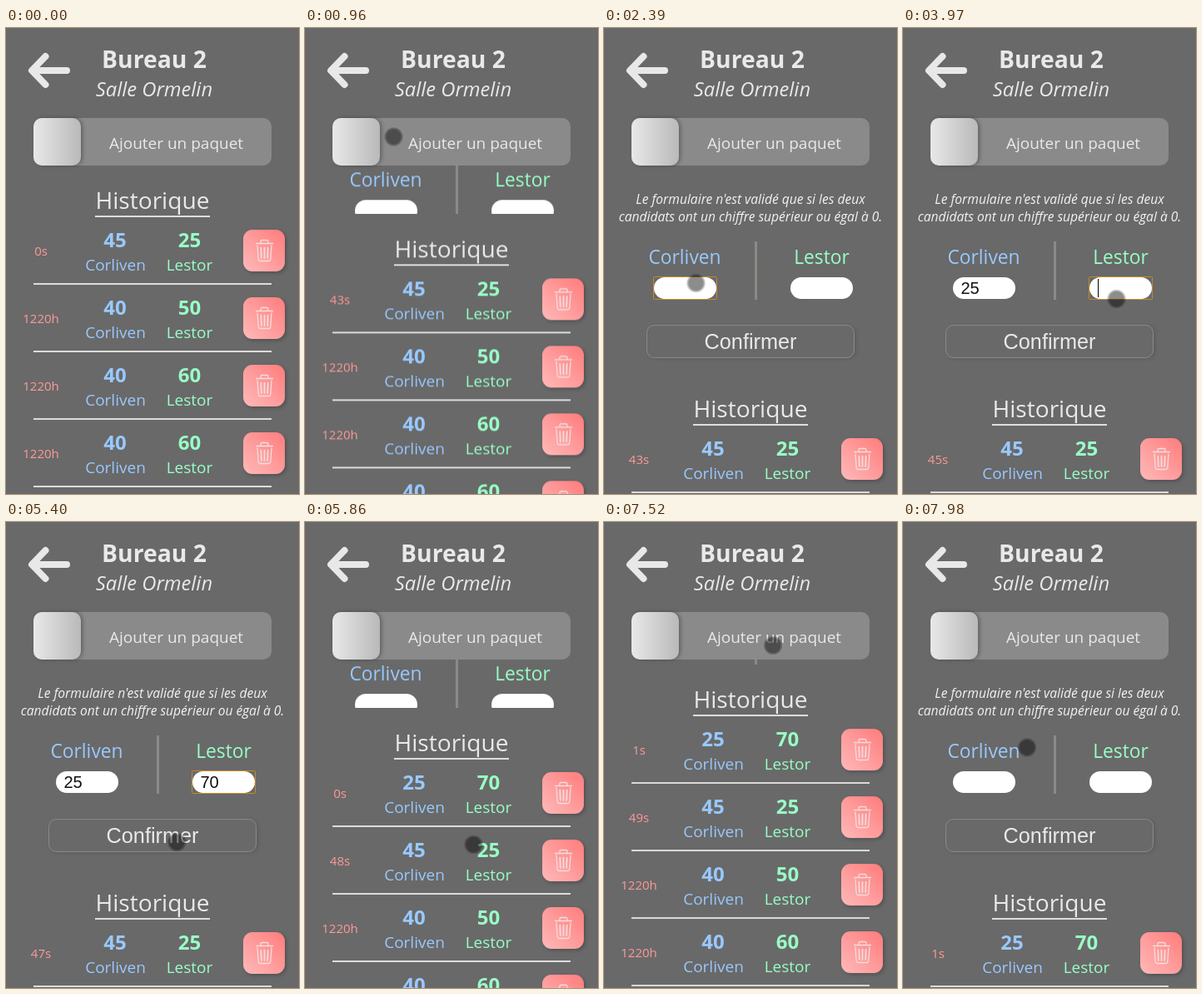
These frames come from a looping animation (352 px wide and 559 px high, 8000 ms). An HTML page:

```html
<!DOCTYPE html>
<html lang="fr">
<head>
<meta charset="utf-8">
<title>Bureau 2</title>
<style>
html, body { margin: 0; height: 100%; overflow: hidden; background: #696969; }
svg { display: block; width: 100vw; height: 100vh; }
text { font-family: "Open Sans", "Noto Sans", sans-serif; fill: #e9e9e9; text-anchor: middle; }
.bold { font-weight: 700; }
.it { font-style: italic; }
.a { fill: #99c9ff; }
.b { fill: #99ffc6; }
.time { fill: #ff9999; font-size: 15px; }
.num { font-size: 24px; font-weight: 700; }
.name { font-size: 19px; }
.label { font-size: 22.8px; }
.hint { font-size: 15.6px; font-style: italic; fill: #f2f2f2; }
.arial { font-family: "Liberation Sans", Arial, sans-serif; }
.digit { font-size: 20px; fill: #111; text-anchor: start; }
.ring { fill: none; stroke: #c48a2a; }
.knob { filter: drop-shadow(2px 0 2px rgba(0, 0, 0, .3)); }
.soft { filter: drop-shadow(2px 2px 2px rgba(0, 0, 0, .22)); }
.faint { filter: drop-shadow(2px 1px 2px rgba(0, 0, 0, .12)); }

.slide { animation: slide 8s ease-in-out infinite; }
#list { --shut: 0px; --open: 250px; }
#form { --shut: -121px; --open: 0px; }
@keyframes slide {
  0%, 10.34% { transform: translateY(var(--shut)); }
  15.34%, 69.93% { transform: translateY(var(--open)); }
  74.93%, 93.46% { transform: translateY(var(--shut)); }
  98.46%, 100% { transform: translateY(var(--open)); }
}

#past { animation: push 8s step-end infinite; }
@keyframes push {
  0% { transform: none; }
  70.31%, 100% { transform: translateY(81px); }
}

.caret { opacity: 0; }
#caret1 { animation: caret1 8s step-end infinite; }
#caret2 { animation: caret2 8s step-end infinite; }
@keyframes caret1 {
  23.44% { opacity: 1; transform: none; }
  29.81% { opacity: 0; }
  32.69% { opacity: 1; transform: translateX(11px); }
  34.94% { opacity: 1; transform: translateX(22px); }
  41.1%, 100% { opacity: 0; }
}
@keyframes caret2 {
  46.69% { opacity: 1; transform: none; }
  53.06% { opacity: 0; }
  57.56% { opacity: 1; transform: translateX(11px); }
  58.19% { opacity: 1; transform: translateX(22px); }
  64.56%, 100% { opacity: 0; }
}

#cursor { animation: move 8s ease-in-out infinite; }
@keyframes move {
  0%, 1.6% { transform: translate(306px, 498px); }
  6.75%, 15.6% { transform: translate(106.5px, 130.5px); }
  15.6% { animation-timing-function: cubic-bezier(.3, 0, .2, 1); }
  23.2%, 40.6% { transform: translate(110.5px, 306px); }
  46.6%, 49% { transform: translate(260px, 327px); }
  49.5%, 49.8% { transform: translate(256.5px, 325px); }
  50.2%, 64.3% { transform: translate(260px, 326px); }
  68.1%, 78.8% { transform: translate(202.5px, 387px); }
  80.2%, 86.7% { transform: translate(207px, 386.5px); }
  92.5%, 96.5% { transform: translate(203px, 148px); }
  99.7%, 100% { transform: translate(149px, 270.5px); }
}
</style>
</head>
<body>
<svg viewBox="0 0 352 559">
  <defs>
    <linearGradient id="steel">
      <stop offset="0" stop-color="#e8e8e8"/>
      <stop offset="1" stop-color="#b9b9b9"/>
    </linearGradient>
    <linearGradient id="rose" x1="0" y1="1" x2="1" y2="0">
      <stop offset="0" stop-color="#ffb9b9"/>
      <stop offset="1" stop-color="#ff7c7c"/>
    </linearGradient>
    <radialGradient id="touch">
      <stop offset=".76" stop-opacity=".45"/>
      <stop offset=".84" stop-opacity=".28"/>
      <stop offset=".94" stop-opacity=".2"/>
      <stop offset="1" stop-opacity="0"/>
    </radialGradient>
    <g id="trash">
      <rect class="soft" x="285" y="242" width="50" height="50" rx="11" fill="url(#rose)"/>
      <g fill="none" stroke="#f3dede" stroke-width="1.3" stroke-linecap="round">
        <path d="M300.5 258.5h20M306 258v-2q0-1.5 1.5-1.5h6q1.5 0 1.5 1.5v2M302 261l1.2 16.5q.2 2 2 2h10.6q1.8 0 2-2l1.2-16.5"/>
        <path d="M306.3 263.5l.5 12.5M310.5 263.5v12.5M314.7 263.5l-.5 12.5" stroke-width="1.7"/>
      </g>
    </g>
  </defs>

  <rect width="352" height="559" fill="#696969"/>

  <g id="form" class="slide">
    <text class="hint" x="176" y="211">Le formulaire n'est validé que si les deux</text>
    <text class="hint" x="176" y="232">candidats ont un chiffre supérieur ou égal à 0.</text>
    <text class="label a" x="97" y="283">Corliven</text>
    <text class="label b" x="261.5" y="283">Lestor</text>
    <rect x="181" y="256" width="3" height="70" fill="#8a8a86"/>
    <rect x="60" y="299" width="75" height="26" rx="13" fill="#fff"/>
    <rect x="224" y="299" width="75" height="26" rx="13" fill="#fff"/>
    <rect class="ring" data-on="1875 3735" x="59.5" y="298.5" width="76" height="27" rx="1"/>
    <rect class="ring" data-on="3735 5625" x="223.5" y="298.5" width="76" height="27" rx="1"/>
    <text class="arial digit" data-on="2615 5625" x="69.5" y="319">2</text>
    <text class="arial digit" data-on="2795 5625" x="80.6" y="319">5</text>
    <text class="arial digit" data-on="4605 5625" x="233.5" y="319">7</text>
    <text class="arial digit" data-on="4655 5625" x="244.6" y="319">0</text>
    <rect id="caret1" class="caret" x="70" y="301" width="1" height="22"/>
    <rect id="caret2" class="caret" x="234" y="301" width="1" height="22"/>
    <rect class="faint" x="51.5" y="356.5" width="249" height="39" rx="9" fill="#696969" stroke="#8a8a8a"/>
    <text class="arial" x="176" y="385" font-size="25.3">Confirmer</text>
  </g>

  <g id="list" class="slide">
    <rect y="165" width="352" height="700" fill="#696969"/>
    <text x="176" y="217" font-size="28.1">Historique</text>
    <rect x="107" y="225" width="138" height="2" fill="#dedede"/>
    <g id="fresh" data-on="5625 8000"></g>
    <g id="past"></g>
  </g>

  <rect width="352" height="165" fill="#696969"/>
  <path d="M73 51H34M47.5 34L31 51L47.5 68" fill="none" stroke="#e8e8e8" stroke-width="8" stroke-linecap="round" stroke-linejoin="round"/>
  <text class="bold" x="178" y="48" font-size="28.3">Bureau 2</text>
  <text class="it" x="178" y="82" font-size="23.8">Salle Ormelin</text>
  <rect x="33" y="108" width="286" height="57" rx="10" fill="#8a8a8a"/>
  <rect class="knob" x="33" y="108" width="57" height="57" rx="10" fill="url(#steel)"/>
  <text x="204.5" y="145" font-size="19">Ajouter un paquet</text>

  <g id="cursor"><circle data-on="160 8000" r="11.5" fill="url(#touch)"/></g>
</svg>
<script>
const LOOP = 8000;

// ages: [start, end, label] spans within the loop
const row = (i, ages, a, b) => `<g transform="translate(0 ${i * 81})">
  ${ages.map(([from, to, s]) => `<text class="time" data-on="${from} ${to}" x="42" y="273">${s}</text>`).join('')}
  <text class="num a" x="131" y="263">${a}</text>
  <text class="name a" x="131.5" y="291">Corliven</text>
  <text class="num b" x="220.5" y="263">${b}</text>
  <text class="name b" x="220.5" y="291">Lestor</text>
  <use href="#trash"/>
  <rect x="33" y="306" width="286" height="2" fill="#dcdcdc"/></g>`;

const old = [[0, LOOP, '1220h']];
const recent = [[0, 815, '0s'], [815, 2615, '43s'], [2615, 4605, '45s'],
  [4605, 5625, '47s'], [5625, 7000, '48s'], [7000, LOOP, '49s']];

document.getElementById('fresh').innerHTML =
  row(0, [[5625, 7000, '0s'], [7000, LOOP, '1s']], 25, 70);
document.getElementById('past').innerHTML =
  row(0, recent, 45, 25) + row(1, old, 40, 50) + row(2, old, 40, 60) + row(3, old, 40, 60);

// Hard on/off switches
for (const el of document.querySelectorAll('[data-on]')) {
  const [from, to] = el.dataset.on.split(' ').map(Number);
  if (to - from === LOOP) continue;
  const key = (ms, opacity) => ({ offset: ms / LOOP, opacity, easing: 'steps(1, end)' });
  const keys = [key(from, 1), key(to, to < LOOP ? 0 : 1)];
  if (from > 0) keys.unshift(key(0, 0));
  if (to < LOOP) keys.push(key(LOOP, 0));
  el.animate(keys, { duration: LOOP, iterations: Infinity });
}
</script>
</body>
</html>
```
